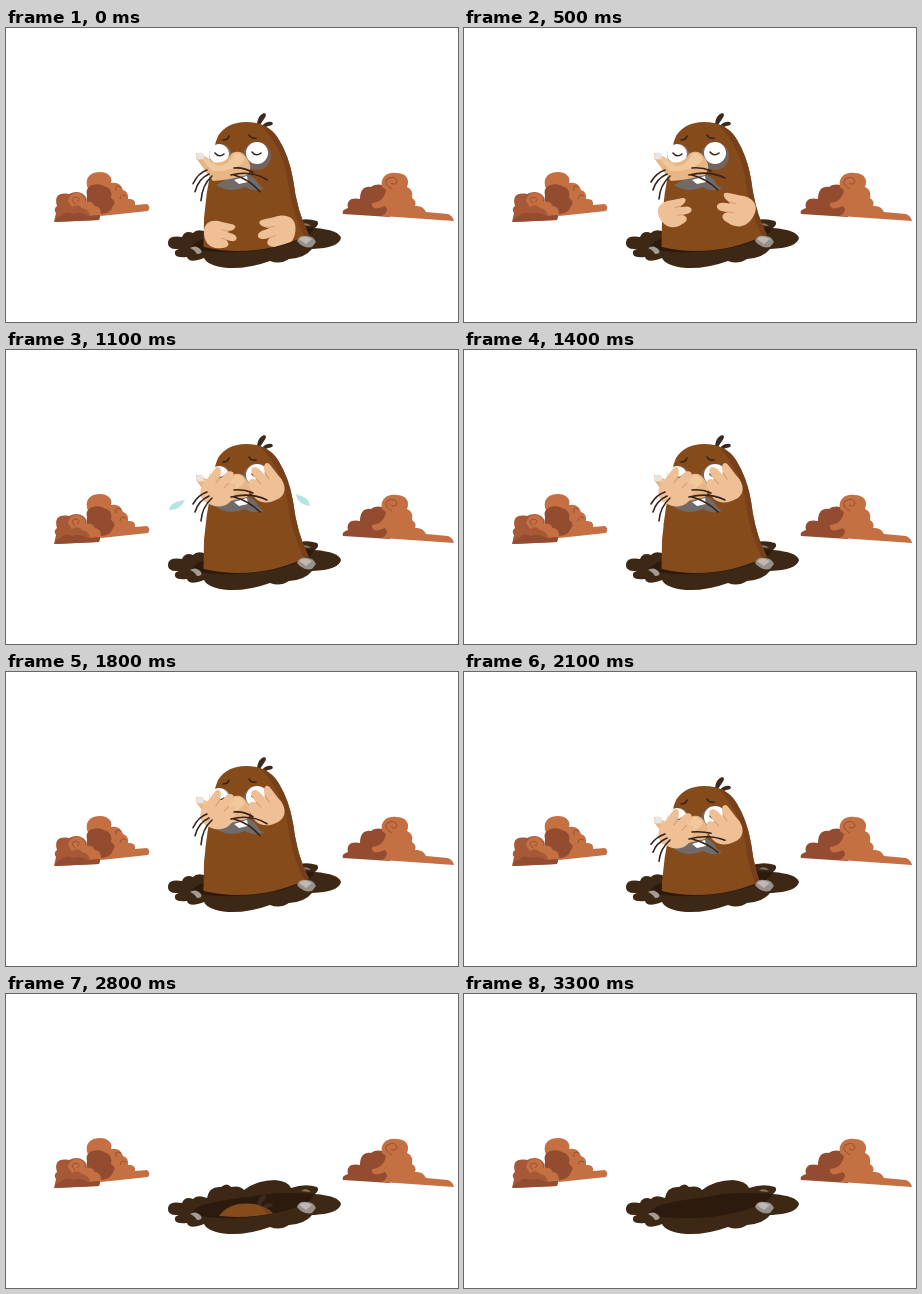
An HTML page that plays this animation: 452 px wide and 294 px high, repeating every 3400 ms.

```html
<!DOCTYPE html>
<html lang="en">
<head>
<meta charset="utf-8">
<style>
html, body { margin: 0; width: 100%; height: 100%; overflow: hidden; background: #fff; }
svg { display: block; width: 452px; height: 294px; }
.line { fill: none; stroke: #35221a; stroke-width: 1.6; stroke-linecap: round; }
.curl { fill: none; stroke: #99502f; stroke-width: 1; }
</style>
</head>
<body>
<svg viewBox="0 0 452 294">
  <defs>
    <clipPath id="above"><path d="M0 0H452V207H303Q284 215 268 219Q231 227 198 219L160 215H0Z"/></clipPath>
    <g id="hand">
      <path fill="#efc095" d="M-16-5C-15-14-6-16 2-13L11-11C18-10 16-5 9-4L7-3 13-1C19 2 17 7 11 6L6 5C11 9 8 13 2 13C-9 15-17 8-16-5Z"/>
      <path d="M2-5Q6-4 9-4M1 3Q4 4 7 5" fill="none" stroke="#d79f70"/>
    </g>
  </defs>

  <!-- clouds of dust -->
  <path fill="#c57043" d="M81 158C79 148 86 144 94 144C103 144 107 150 105 155Q114 153 117 162Q123 164 122 171Q130 170 129 177L141 176Q145 179 142 183L95 188Z"/>
  <path fill="#944c31" d="M81 167C78 157 91 154 98 158Q107 160 105 170Q111 174 107 178Q104 187 92 186L80 178Z"/>
  <path fill="#a65837" d="M50 185Q47 181 51 178C48 168 53 164 63 166Q71 162 77 166Q82 170 80 174Q88 172 89 178Q96 179 95 186L93 192 48 194Z"/>
  <path fill="#c57043" d="M62 173Q64 164 72 165Q80 167 79 174Q87 173 88 178Q95 178 95 187L84 188Q83 181 76 180Q72 175 66 179Z"/>
  <path fill="#944c31" d="M49 194Q49 189 55 188Q59 182 67 186Q75 183 82 188L94 187 93 192Z"/>
  <path class="curl" d="M69 176Q63 170 70 169Q76 171 71 174M110 163Q108 156 115 159M114 171Q115 165 120 168"/>
  <path fill="#944c31" d="M337 186Q335 182 342 180C340 172 346 169 354 171C354 161 359 158 365 159C372 154 381 157 383 164L384 189Z"/>
  <path fill="#c57043" d="M376 159C374 149 381 144 390 145C401 145 404 152 401 159Q408 162 406 170Q411 173 409 178Q417 177 420 184L442 186Q447 188 448 193L376 188Q384 183 379 178Q365 184 366 175Q378 174 380 162Z"/>
  <path class="curl" d="M386 161Q377 156 381 151Q389 147 391 153Q390 158 385 155"/>

  <!-- burrow -->
  <path fill="#3d2816" d="M162 214Q163 207 176 209Q179 202 187 205Q191 200 201 204Q203 192 215 193Q221 188 225 193Q234 191 238 196Q251 186 269 186Q282 187 285 194Q299 189 311 193Q314 196 309 200Q333 202 335 210Q333 220 306 221Q299 230 283 231Q274 237 264 233Q242 241 222 240Q202 238 198 230Q183 236 181 229Q170 230 169 226Q168 222 173 221Q161 222 162 214Z"/>
  <path fill="#2d1a0f" d="M185 220Q190 211 205 209Q228 204 243 203Q265 197 308 200Q306 208 288 214Q263 223 231 224Q201 225 185 220Z"/>
  <path fill="#8b7868" d="M295 197Q300 193 305 198Z"/>

  <g clip-path="url(#above)">
    <g id="mole">
      <path fill="#3b2a20" d="M251 96Q252 87 258 85Q262 86 258 91L254 97ZM256 98Q260 93 266 94Q269 97 262 98L258 100Z"/>
      <path fill="#864b1b" d="M197 250L198 190Q200 165 205 141Q207 119 212 108Q221 94 240 94Q262 94 272 110Q283 127 287 151Q291 184 303 207L310 250Z"/>
      <path fill="#77401b" d="M255 97Q267 101 273 112Q283 129 287 151Q291 184 303 207L298 208Q285 181 282 155Q278 122 255 97Z"/>
      <circle cx="251" cy="128" r="14" fill="#74645b"/>
      <circle cx="214" cy="127" r="11" fill="#89796f"/>
      <circle cx="213" cy="126" r="10" fill="#fff"/>
      <circle cx="251" cy="125" r="11" fill="#fff"/>
      <path class="line" d="M209 125Q213 130 218 126M246 124Q250 129 255 125M217 112Q222 112 223 108M243 107Q245 111 250 110"/>
      <path fill="#706a68" d="M210 157Q222 151 228 146Q242 143 250 152Q253 158 258 161Q246 164 239 159Q224 166 210 157Z"/>
      <path fill="#fff" d="M228 152L241 148 242 154 233 156Z"/>
      <path fill="#e8b684" d="M190 125Q197 126 207 134Q219 137 226 125Q235 121 240 129Q248 139 241 147Q224 152 207 153Q200 144 190 130Z"/>
      <path fill="#f2c99d" d="M192 126Q203 132 212 138Q222 138 229 125Q236 124 239 131Q231 144 206 143Z"/>
      <ellipse cx="194" cy="128" rx="4" ry="3.5" fill="#e7e4e1"/>
      <g id="paws"><use href="#hand"/><use href="#hand"/></g>
      <g id="whiskers"></g>
    </g>
  </g>

  <path fill="#97908b" d="M291 213Q293 207 300 208Q307 207 310 214L306 219Q297 221 291 213Z"/>
  <path fill="#c1b8b3" d="M293 211Q298 206 306 211L300 216Z"/>
  <path fill="#a69b92" d="M184 220Q190 216 195 222Q197 226 191 226Q189 222 184 220Z"/>
  <g id="tears" fill="#b5e5e2">
    <path d="M-8 5Q-7-3 8-5Q4 5-8 5Z"/><path d="M8 6Q7-3-6-6Q-5 4 8 6Z"/>
  </g>
</svg>
<script>
const LOOP = 3400, STEP = 100;
const byId = id => document.getElementById(id);
const [leftPaw, rightPaw] = byId('paws').children;
const [leftTear, rightTear] = byId('tears').children;

// Piecewise linear interpolation of [time, ...values] keys.
function track(keys, t) {
  let i = 1;
  while (i < keys.length - 1 && keys[i][0] < t) i++;
  const a = keys[i - 1], b = keys[i];
  const p = Math.max(0, Math.min(1, (t - a[0]) / (b[0] - a[0])));
  return a.slice(1).map((v, k) => v + (b[k + 1] - v) * p);
}

const lift = [[0, 0], [100, -11], [300, 0], [1900, 0], [2100, 20], [2400, 58], [2500, 71], [3000, 145]];
// x, y, angle, scale
const leftPath = [[200, 214, 207, 0, 1], [500, 211, 185, -25, 1], [800, 214, 138, -65, 1.2]];
const rightPath = [[200, 271, 204, 0, 1.15], [500, 272, 182, 25, 1.15], [800, 259, 134, 65, 1.2]];
// start x, y, control x, y, end x, y
const hairs = [
  [201, 142, 192, 145, 187, 154], [203, 146, 192, 151, 189, 162], [206, 148, 196, 157, 195, 171],
  [228, 140, 238, 139, 247, 143], [225, 147, 245, 142, 261, 150], [228, 147, 243, 151, 254, 162]
];
byId('whiskers').innerHTML = '<path class="line"/>'.repeat(hairs.length);
const whiskers = [...byId('whiskers').children];

function place(paw, path, t, side, sob) {
  const [x, y, angle, size] = track(path, t);
  paw.setAttribute('transform', `translate(${x} ${y + sob}) rotate(${angle}) scale(${size * side} ${size})`);
}

function draw(t) {
  byId('mole').setAttribute('transform', `translate(0 ${track(lift, t)[0]})`);
  const sob = t >= 800 && t < 1900 ? Math.sin((t - 1100) * Math.PI / 300) : 0;
  place(leftPaw, leftPath, t, 1, sob);
  place(rightPaw, rightPath, t, -1, sob);

  const sway = 2 * Math.sin((t - 500) * Math.PI / 300);
  whiskers.forEach((w, i) => {
    const [x, y, cx, cy, ex, ey] = hairs[i];
    w.setAttribute('d', `M${x} ${y}Q${cx} ${cy} ${ex} ${ey + sway}`);
  });

  const fall = (t - 800) % 600 / 600;
  byId('tears').style.display = t >= 900 && t < 1800 && fall > .1 && fall < .66 ? '' : 'none';
  const y = 138 + 64 * fall * fall;
  leftTear.setAttribute('transform', `translate(${198 - 54 * fall} ${y + 1})`);
  rightTear.setAttribute('transform', `translate(${270 + 52 * fall} ${y - 4})`);
}

const start = performance.now();
function tick() {
  const t = (performance.now() - start) % LOOP;
  draw(Math.floor(t / STEP) * STEP);
  requestAnimationFrame(tick);
}
tick();
</script>
</body>
</html>
```
